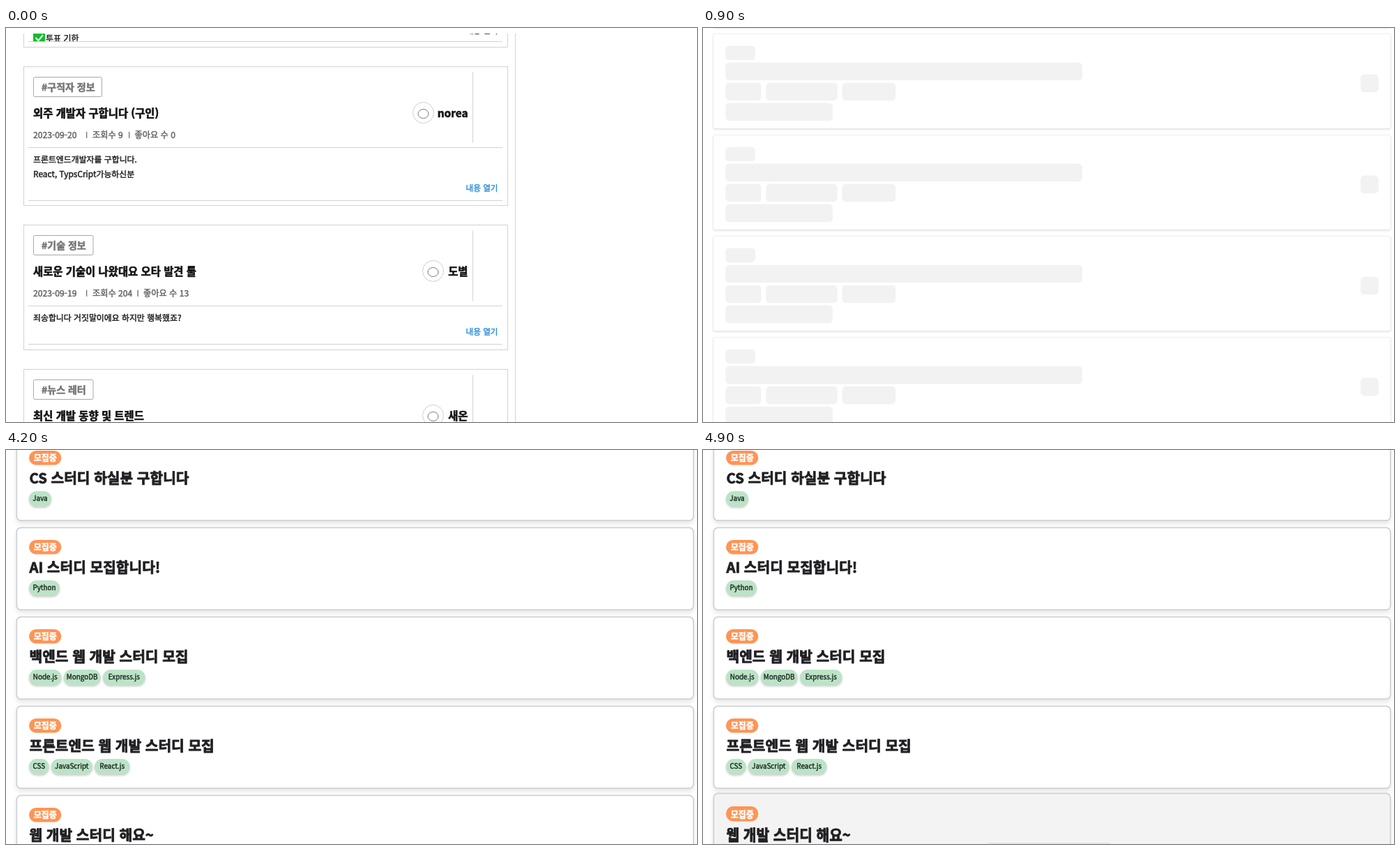
Write an HTML page that moves like this. It is 991 by 565 pixels and loops after 5 s.

```html
<!DOCTYPE html>
<html lang="ko">
<head>
<meta charset="utf-8">
<style>
  html, body { margin: 0; width: 100%; height: 100%; overflow: hidden; background: #fff; }
  svg { display: block; font-family: "Noto Sans CJK KR", "Noto Sans CJK", "Noto Sans", sans-serif; }
  text { stroke-linejoin: round; }
  .line { fill: none; stroke: #d2d2d2; }
  .bone { fill: #ededed; }
  .sheet { fill: #fff; stroke: #ebebeb; filter: drop-shadow(0 1px 1px rgba(0, 0, 0, .2)); }
  .card { fill: #fff; stroke: #cfd1d4; stroke-width: 1.7; filter: drop-shadow(0 4px 3px rgba(0, 0, 0, .09)); }
  .pill { fill: #bce3c7; filter: drop-shadow(0 2px 1.5px rgba(0, 0, 0, .2)); }
</style>
</head>
<body>
<svg id="stage" width="991" height="565" viewBox="0 0 991 565"></svg>
<script>
const stage = document.getElementById('stage');

// Text centred vertically on y; the thin outline gives rounder, heavier strokes
const text = (x, y, size, weight, color, s, anchor = 'start') =>
  `<text x="${x}" y="${y + size * .37}" font-size="${size}" font-weight="${weight}" fill="${color}"
    stroke="${color}" stroke-width="${size * .04}" text-anchor="${anchor}">${s}</text>`;
const rect = (x, y, w, h, r, attrs) =>
  `<rect x="${x}" y="${y}" width="${w}" height="${h}" rx="${r}" ${attrs}/>`;
const line = d => `<path class="line" d="${d}"/>`;

// Forum posts
function post(p) {
  const y = p.y, end = p.body.length * 21;
  const meta = p.meta.map(([x, s]) => text(x, y + 98, 12.2, 400, '#666', s)).join('');
  const bars = p.bars.map(x => text(x, y + 98, 10, 400, '#666', 'ㅣ', 'middle')).join('');
  return rect(25.5, y, 694, p.h, 0, 'class="line"')
    + rect(39.5, y + 15, p.tagW, 28, 2, 'fill="#fff" stroke="#a8a8a8"')
    + text(51, y + 29.5, 14, 700, '#777', p.tag)
    + text(39, y + 66.5, 15.4, 700, '#151515', p.title)
    + `<circle cx="${p.face}" cy="${y + 66}" r="15" fill="#fff" stroke="#d0d0d0"/>`
    + `<ellipse cx="${p.face}" cy="${y + 67.5}" rx="7.5" ry="6.5" fill="#fff" stroke="#777"/>`
    + text(662.5, y + 66.5, 15.4, 700, '#151515', p.name, 'end')
    + line(`M669.5 ${y + 8}v101M32 ${y + 116}h680M32 ${y + 150 + end}h680`)
    + meta + bars
    + p.body.map((s, i) => text(39, y + 133.5 + i * 20.5, 11.9, 400, '#222', s)).join('')
    + text(705.5, y + 132.5 + end, 11.6, 400, '#2d8fdd', '내용 열기', 'end');
}

const posts = [
  { y: 55.5, h: 199, tag: '#구직자 정보', tagW: 98, title: '외주 개발자 구합니다 (구인)', face: 598.5, name: 'norea',
    meta: [[39, '2023-09-20'], [124, '조회수 9'], [184.5, '좋아요 수 0']], bars: [115.5, 176.5],
    body: ['프론트엔드개발자를 구합니다.', 'React, TypsCript가능하신분'] },
  { y: 282.5, h: 179, tag: '#기술 정보', tagW: 85.5, title: '새로운 기술이 나왔대요 오타 발견 툴', face: 612.5, name: '도별',
    meta: [[39, '2023-09-19'], [124, '조회수 204'], [197, '좋아요 수 13']], bars: [115.5, 189],
    body: ['죄송합니다 거짓말이에요 하지만 행복했죠?'] },
  { y: 489.5, h: 179, tag: '#뉴스 레터', tagW: 85.5, title: '최신 개발 동향 및 트렌드', face: 612.5, name: '새온',
    meta: [], bars: [], body: [] }
];

const forum = `<clipPath id="top"><path d="M0 8H991V20H0z"/></clipPath>
  <g clip-path="url(#top)">
    ${rect(39, 7, 17, 16, 2, 'fill="#14bd2c"')}
    <path d="M42.5 14l4 4 6.5-8" fill="none" stroke="#fff" stroke-width="2"/>
    ${text(57, 15.5, 12, 400, '#222', '투표 기한')}
    ${text(705.5, 4, 11.6, 400, '#444', '내용 열기', 'end')}
  </g>`
  + line('M32 19.5h680M25.5 8V27.5H719.5V8M730.5 8V565')
  + posts.map(post).join('');

// Loading placeholders
const bones = [[32.3, 17, 42.7, 20.5], [32.3, 41, 511.7, 25.6], [32.3, 70, 51.2, 25.6], [90.3, 70, 102.4, 25.6],
  [199.5, 70, 76.8, 25.6], [32.3, 99, 153.6, 25.6], [943.2, 58, 25.6, 25.6]];
const skeleton = [-1, 0, 1, 2, 3].map(i => {
  const y = 8.5 + i * 145.1;
  return rect(15, y, 971, 135.5, 2, 'class="sheet"')
    + bones.map(([x, dy, w, h]) => rect(x, y + dy, w, h, 5.5, 'class="bone"')).join('');
}).join('');

// Study groups; tags are [name, x, width]
const studies = [
  ['CS 스터디 하실분 구합니다', [['Java', 33, 32]]],
  ['AI 스터디 모집합니다!', [['Python', 33, 44]]],
  ['백엔드 웹 개발 스터디 모집', [['Node.js', 33, 46.5], ['MongoDB', 82.7, 53], ['Express.js', 139, 60.7]]],
  ['프론트엔드 웹 개발 스터디 모집', [['CSS', 33, 28.7], ['JavaScript', 64.7, 59.3], ['React.js', 127, 50.5]]],
  ['웹 개발 스터디 해요~', []]
];
const study = ([title, tags], i) => {
  const y = i * 128 - 17;
  return `<g id="s${i}">` + rect(15.3, y + .4, 970.6, 117.7, 6, 'class="card"')
    + rect(33, y + 18, 46.3, 20.5, 10.2, 'fill="#ff9455"')
    + text(56.2, y + 28.5, 12, 700, '#fff', '모집중', 'middle')
    + text(33.5, y + 57.5, 20.3, 700, '#202024', title)
    + tags.map(([s, x, w]) => rect(x, y + 76, w, 22, 11, 'class="pill"')
      + text(x + w / 2, y + 86.5, 9.9, 400, '#1d2a22', s, 'middle')).join('')
    + '</g>';
};
const board = studies.map(study).join('') + rect(408, 563.3, 177, 4, 2, 'id="handle" fill="#e4e4e4"');

stage.innerHTML = [forum, skeleton, board].map(s => `<g>${s}</g>`).join('');
const scenes = [...stage.children];
const hovered = document.getElementById('s4');
const handle = document.getElementById('handle');

const smooth = p => p * p * (3 - 2 * p);
const clamp = p => Math.min(1, Math.max(0, p));

function draw(now) {
  const t = Math.floor(now % 5000 / 100) * 100;
  const current = t < 400 ? 0 : t < 4200 ? 1 : 2;
  scenes.forEach((g, i) => g.style.display = i === current ? '' : 'none');

  // Two-second pulse between full and half opacity
  const phase = (t - 350 + 2000) % 2000 / 1000;
  scenes[1].setAttribute('opacity', 1 - .5 * smooth(phase < 1 ? phase : 2 - phase));

  // Hover grows the last card vertically about its centre
  const p = smooth(clamp((t - 4200) / 500)), mid = 554.3, shade = 255 - 12 * p;
  hovered.setAttribute('transform', `translate(0 ${mid}) scale(1 ${1 + .05 * p}) translate(0 ${-mid})`);
  hovered.firstChild.style.fill = `rgb(${shade},${shade},${shade})`;
  handle.setAttribute('opacity', p);
  requestAnimationFrame(draw);
}
requestAnimationFrame(draw);
</script>
</body>
</html>
```
